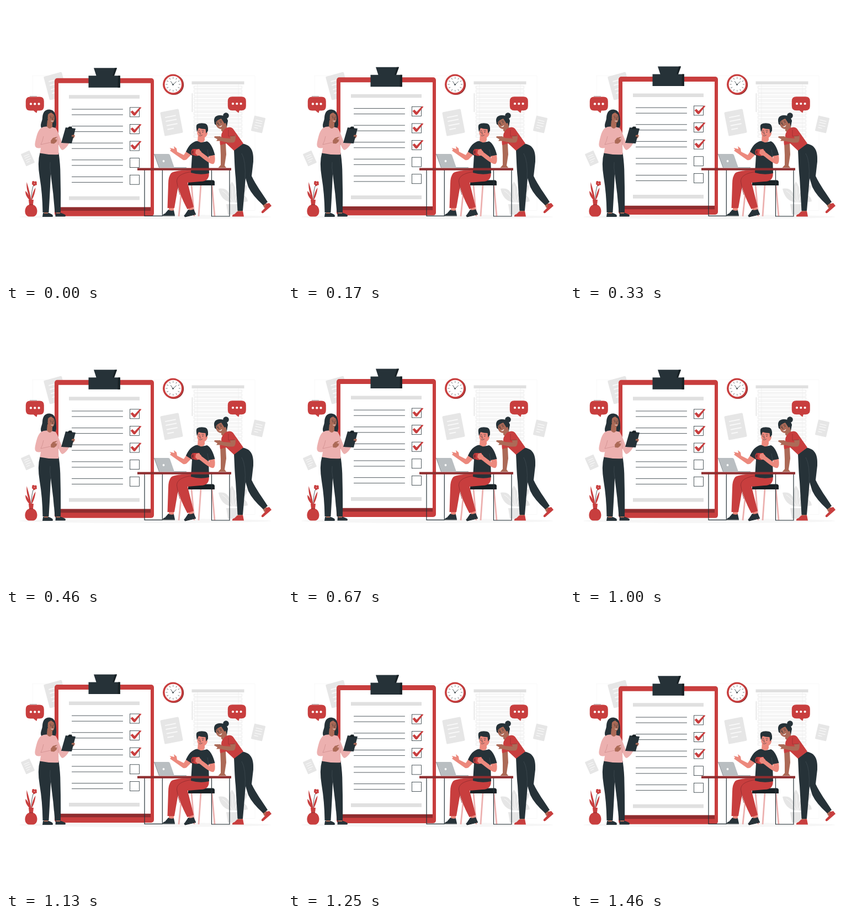
Write an HTML page that moves like this. It is 500 px wide and 500 px high and loops after 1.5 s.

```html
<!DOCTYPE html>
<html lang="en">
<head>
<meta charset="utf-8">
<title>Checklist meeting</title>
<style>
  html, body { margin: 0; width: 100%; height: 100%; overflow: hidden; background: #fff; }
  svg { display: block; width: 100%; height: 100%; }
  .red { fill: #c83e3e; }
  .deep { fill: #8f2d2f; }
  .dark { fill: #263238; }
  .black { fill: #192226; }
  .pink { fill: #ecb0af; }
  .brown { fill: #ac6a57; }
  .peach { fill: #ec897d; }
  .grey { fill: #e0e0e0; }
  .pale { fill: #e6e6e6; }
  .white { fill: #fff; }
  .line { fill: none; stroke: #263238; stroke-width: .8; stroke-linecap: round; }
  .thin { stroke-width: .6; }
  .fold { fill: none; stroke: #c68383; stroke-width: .6; }
  .seam { fill: none; stroke: #465158; stroke-width: .6; }
</style>
</head>
<body>
<svg viewBox="0 0 500 500">
  <defs>
    <g id="sheet">
      <rect class="pale" x="-17" y="-22" width="34" height="44" rx="2"/>
      <path d="M-10-11H10M-10-4H10M-10 4H10M-10 11H2" stroke="#f8f8f8" stroke-width="2"/>
    </g>
    <g id="bubble">
      <path class="red" d="M8 0H25Q33 0 33 8V17Q33 25 25 25H21L19.5 29.5 14 25H8Q0 25 0 17V8Q0 0 8 0Z"/>
      <g class="white"><circle cx="9.200" cy="12.800" r="2.100"/><circle cx="16.500" cy="12.800" r="2.100"/><circle cx="23.800" cy="12.800" r="2.100"/></g>
    </g>
  </defs>

  <g id="room">
    <path d="M47 126.500H451V370.500H420M48.500 126V165" fill="none" stroke="#f6f6f6" stroke-width=".8"/>
    <ellipse cx="252" cy="382" rx="228" ry="4" fill="#f6f6f6"/>
    <use href="#sheet" transform="translate(90 145) rotate(-15)"/>
    <use href="#sheet" transform="translate(300 211) rotate(-11)"/>
    <use href="#sheet" transform="translate(457 214.500) rotate(13) scale(.61 .64)"/>
    <use href="#sheet" transform="translate(39.500 276) rotate(-24) scale(.5 .55)"/>
    <g id="blind">
      <rect class="grey" x="336.500" y="136.500" width="95" height="5.500"/>
      <path d="M337.300 158V192" stroke="#ccc" stroke-width=".8"/>
    </g>
    <g class="pale">
      <path d="M399 359H425L421 378H402Z"/>
      <path d="M411 356C400 355 389 350 385 331C397 329 402 334 406 343C402 332 405 325 409 318C416 326 417 335 414 343C419 333 427 325 437 324C438 332 433 339 425 342C434 342 437 347 438 354C427 356 419 356 411 356Z"/>
    </g>
    <path d="M411 357C407 349 400 340 392 335M412 357C411 348 410 336 410 326M413 357C416 346 424 335 432 329" fill="none" stroke="#fff" stroke-width=".7"/>
    <g id="clock">
      <circle class="deep" cx="303.900" cy="142.800" r="18.300"/>
      <circle class="red" cx="302.500" cy="142" r="18.500"/>
      <circle class="white" cx="302.800" cy="142" r="15.200"/>
      <path class="line" d="M298.500 136.500 302.500 142.500 308.500 137"/>
      <circle class="dark" cx="302.500" cy="142.500" r="1.200"/>
    </g>
  </g>

  <g id="board">
    <rect class="red" x="88" y="131" width="180" height="250" rx="5"/>
    <path class="white" d="M95 140H262V365H95Z"/>
    <path class="deep" d="M95 364.700H262V371.300H95Z"/>
    <path class="grey" d="M114 161.500H242V168H114ZM114 345H242V351.700H114Z"/>
    <path class="dark" d="M159 112.500H201L196 126.500H206.800V148H149.500V126.500H163.500Z"/>
    <path class="black" d="M197 112.500H201L196 126.500H193ZM203 126.500H206.800V148H202.500Z"/>
  </g>

  <use href="#bubble" x="35.800" y="164.600"/>
  <path d="M43 163.500H56" stroke="#999" stroke-width=".8"/>
  <use href="#bubble" x="401.800" y="164.200"/>

  <g id="vase">
    <path class="line" d="M46 351C46 341 47 331 50.500 323"/>
    <path class="red" d="M44 351C40 340 36.500 332 37.500 319C41 330 44 341 45.500 351ZM43 352C37 346 34.500 340 35.500 335C39 339 43 345 44.500 352ZM46 351C47 342 50 334 53.500 329C53 338 50 346 47 351Z"/>
    <g class="red"><circle cx="49.500" cy="319.300" r="2.300"/><circle cx="53.500" cy="319.800" r="2.300"/><circle cx="54" cy="322.800" r="2"/><circle cx="51" cy="324" r="2.200"/><circle cx="48.800" cy="322" r="1.900"/></g>
    <path class="red" d="M41 351H50L49 360C59 363 59 381 49 381.500H42C32 381 32 363 42 360Z"/>
    <path d="M42 360H49" stroke="#8f2d2f"/>
  </g>

  <g id="presenter">
    <path class="dark" d="M67 375C73 373 77 374 84 378Q86 381 84 382H66ZM90 374C96 373 101 375 107 378Q109 380 107 381.500H89.500Z"/>
    <path class="brown" d="M69 370H76V376H69ZM91 370H98V376H91Z"/>
    <path class="dark" d="M61.500 266H95.500Q98.500 288 98.500 305 99.500 340 99 374H88.500Q86 340 81 304C80 330 79 350 77.500 374H66.500Q66 340 61 310 56.500 283 61.500 266Z"/>
    <path class="seam" d="M80 283Q79 293 81 304"/>
    <path class="dark" d="M79 187.500C70 187 66.500 194 66 202 66 209 61 214 64 221Q72 226 88 223 92.500 217 90.500 208 91.500 189 79 187.500Z"/>
    <path class="pink" d="M68 219Q79 217 90 221L94 228 102 249 115 237.500 119.500 241C113 251 108 260 102 261Q98 259 95 250L95.500 269Q78 270 61.500 266.500L63 257C54 259 51 255 53 246C56 232 59 221 68 219Z"/>
    <path class="fold" d="M68 236Q66 246 63 251L81 247M93 236 95 252"/>
    <path class="brown" d="M75 207H84V218Q82 222 79 222 75 221 74 217Z"/>
    <path class="brown" d="M76 196Q79 191 84 193 88.500 196 88 204 87 212 82.500 212.500 77 211 75.500 205Z"/>
    <path class="dark" d="M74 208C73 197 78 194 82 193L87 197Q91 202 88 214L91 216Q91 189 79 188 68 190 68 204Z"/>
    <path class="line thin" d="M79.500 200 82 199.500M85 199.500 87 200M84 202V205.500L85.500 205.700"/>
    <circle class="dark" cx="81.300" cy="202.500" r=".8"/><circle class="dark" cx="86" cy="202.500" r=".7"/>
    <path class="white" d="M80.500 207.500Q84 209 86.500 207.500 84 211 80.500 207.500Z"/>
    <path class="brown" d="M81 244 85 239 92 237 91.500 239 88 241 92.500 242 91.500 246 87 249.500 81.500 249Z"/>
    <path class="brown" d="M117 236 122 232 125 235 123 239 119 241Z"/>
    <path class="dark" d="M108 220 126 222 119 249 100 248Z"/>
    <path class="black" d="M112 221 114 218.500H119L120 222 119 223H112Z"/>
    <path class="brown" d="M119 234 124 233 123 236 119 237Z"/>
  </g>

  <g id="worker">
    <path d="M319 324 313 381M336 324 341 381M353 324 349 381M373 324 378 381" stroke="#ecb0af" stroke-width="2.800"/>
    <path class="black" d="M330 315.500H375Q378 316 378 319V325H330Z"/>
    <path class="peach" d="M295 364H304V373H295ZM331 364H339V373H331Z"/>
    <path class="red" d="M342 297C323 297 305 298 299 303Q294 309 294 322L292.500 366H305L313 320 348 316Z"/>
    <path class="red" d="M367 298Q371 318 352 318L329 320 340 364 328.500 368C319 350 312 333 310 319 308 306 317 301 340 299Z"/>
    <path d="M338 300C322 302 309 307 309.500 318Q311 330 315 342" fill="none" stroke="#8f2d2f" stroke-width=".8"/>
    <path class="dark" d="M294 369Q299 372 304 370L306 379.500H284Q284 377 288 376ZM330 369Q335 371 340 368L344 377 324 382Q321 380 324 378Z"/>
    <path d="M284 380H306M324 382 344 377.500" stroke="#111a1d"/>
    <path class="peach" d="M330 258 322 270 310 264 309 258 304 254 305 259 296.500 257 299 260 297 262 304 267 321 279Q326 280 329 276L338 267Z"/>
    <path class="dark" d="M346 244.500Q357 248 364 245 373 249 378.500 270L367 273 368 303Q352 307 335 302L337 271 326 264Q333 247 346 244.500Z"/>
    <path class="seam" d="M339 258 337 271M367 273 365 260"/>
    <path class="peach" d="M348 233H360V243Q358 248 352 247L347 244.500Z"/>
    <path class="peach" d="M346 221Q354 217 364 220L365 231Q363 239 356 239 348 239 346.500 231Z"/>
    <path class="dark" d="M346 228Q343.500 217 346 214.500 351 211 361 213 367 215 366 226L362.500 231 361.500 223Q354 223 349 221Z"/>
    <path class="line thin" d="M348 226 351 225.500M355 225.500 358.500 226M352 228 351 232 353 232M350 235Q353 236 355.500 234"/>
    <circle class="dark" cx="349.500" cy="228.500" r=".8"/><circle class="dark" cx="356.500" cy="228.500" r=".8"/>
    <path class="peach" d="M367 272 378 270Q380 283 376 286 371 288 353 273L347 269 344 262 347 260 353 264 369 276Z"/>
    <path class="deep" d="M337 259H350V270Q344 273 338 270Z"/>
    <path class="red" d="M340 259H351V270Q346 273 340 270Z"/>
    <path d="M340 261Q336 260 336 265L337 269 341 268" fill="none" stroke="#c83e3e" stroke-width="1.300"/>
    <path class="peach" d="M344 261 349 259 354 264 352 271 347 271 343 267Z"/>
  </g>

  <g id="helper">
    <path class="brown" d="M388 247 398 249 399 269 396 289 399 293H384.500L389 288 389 270Z"/>
    <path class="brown" d="M420 367H428V375H420ZM463 356 469 354 475 362 468 366Z"/>
    <path class="red" d="M419 372Q425 374 429 371L431 381.500H410Q409 378 414 377ZM472 358 477 357 481 362 466 375Q462 376 463 372L469 366Z"/>
    <path class="dark" d="M413 261 429 249.500C445 252 449 264 448 282L445 308C453 325 464 339 474 355L466 361Q446 343 439 328L434 312 429 371H419.500L416 311C414 290 414 278 413 261Z"/>
    <path class="seam" d="M427 267Q435 281 433 315"/>
    <circle class="dark" cx="398.500" cy="198.500" r="5.300"/>
    <path class="dark" d="M378 214Q374 199 386 198 399 197 402 208L400 219 388 221Z"/>
    <path class="brown" d="M390 215 398 211 401 223 396 231 390 226Z"/>
    <path class="red" d="M397 222Q406 217 411 222L430 249 413 262 399 249 388 252Q386 242 390 237 389 230 397 222Z"/>
    <path class="brown" d="M380 209 390 203 397 211Q397 221 391 223 384 223 381 217Z"/>
    <path class="dark" d="M379.500 212Q382 206 390 204L396 213 402 209Q400 199 388 198 375 201 379.500 212Z"/>
    <path class="line thin" d="M381.500 211 383.500 209.500M387 208.500 390 208.500M384.500 211.500 384.500 215 386.500 215"/>
    <circle class="dark" cx="383" cy="212.500" r=".8"/><circle class="dark" cx="389.500" cy="211" r=".8"/>
    <path class="white" d="M385 218.500Q389 218.500 391.500 215.500 390.500 221 385 218.500Z"/>
    <path class="brown" d="M404 232 415.500 233Q417 244 413 247 405 249 389 244.500L381 244.500 383 241.500 377 238 378 236 388 236 393 239 407 240Z"/>
    <path class="red" d="M403 222Q411 219 415 235L403 236Z"/>
    <path class="fold" d="M403 224V236L415 235" style="stroke:#8f2d2f"/>
  </g>

  <g id="desk">
    <path d="M251 297V380.300H283.300V297M372.500 297V381H405V297" fill="none" stroke="#263238" stroke-width="1.200"/>
    <path class="deep" d="M238 293.500H408V297.700H238Z"/>
    <path d="M302 292.800H327" stroke="#8d9599" stroke-width="1.300"/>
    <path d="M269 268H294Q296 268 297 270L305 293H278Z" fill="#b9bec1"/>
    <path d="M268.500 268 277.500 293" stroke="#7d868b"/>
    <circle class="white" cx="285.500" cy="281" r="1.900"/>
  </g>
</svg>
<script>
  const PERIOD = 1500, LIFT = 6.5, PHASE = 20;
  const byId = id => document.getElementById(id);
  const add = (parent, markup) => parent.insertAdjacentHTML('beforeend', markup);
  const board = byId('board'), blind = byId('blind'), clock = byId('clock');

  for (let row = 0; row < 5; row++) {
    const y = 184 + row * 30.6;
    add(board, `<path class="line" d="M119.500 ${y + 3.2}H211.500M119.500 ${y + 13.2}H211.500"/>
      <rect class="line" x="224.500" y="${y}" width="17" height="17"/>`);
    if (row < 3) add(board, `<path class="red" transform="translate(0 ${y})"
      d="M225.500 8 229 5.500 233 9.500 242.500-.5 245.500 0 234.500 14Q232.500 16 230.500 14Z"/>`);
  }

  for (let y = 145; y < 236; y += 6.8)
    add(blind, `<path d="M340.500 ${y}H427.500V${y + 4.5}H340.500Z" fill="#fdfdfd" stroke="#e6e6e6" stroke-width=".8"/>`);
  add(blind, '<path d="M347 142V234M421 142V234" stroke="#ededed" stroke-width=".7"/>');

  for (let angle = 0; angle < 360; angle += 30)
    add(clock, `<path class="line thin" d="M302.800 129V131.500" transform="rotate(${angle} 302.800 142)"/>`);

  // The board rises and sinks at constant speed.
  function draw() {
    const phase = (performance.now() + PHASE) % PERIOD / PERIOD;
    const lift = LIFT * (1 - Math.abs(1 - 2 * phase));
    board.setAttribute('transform', `translate(0 ${-lift})`);
    requestAnimationFrame(draw);
  }
  draw();
</script>
</body>
</html>
```
